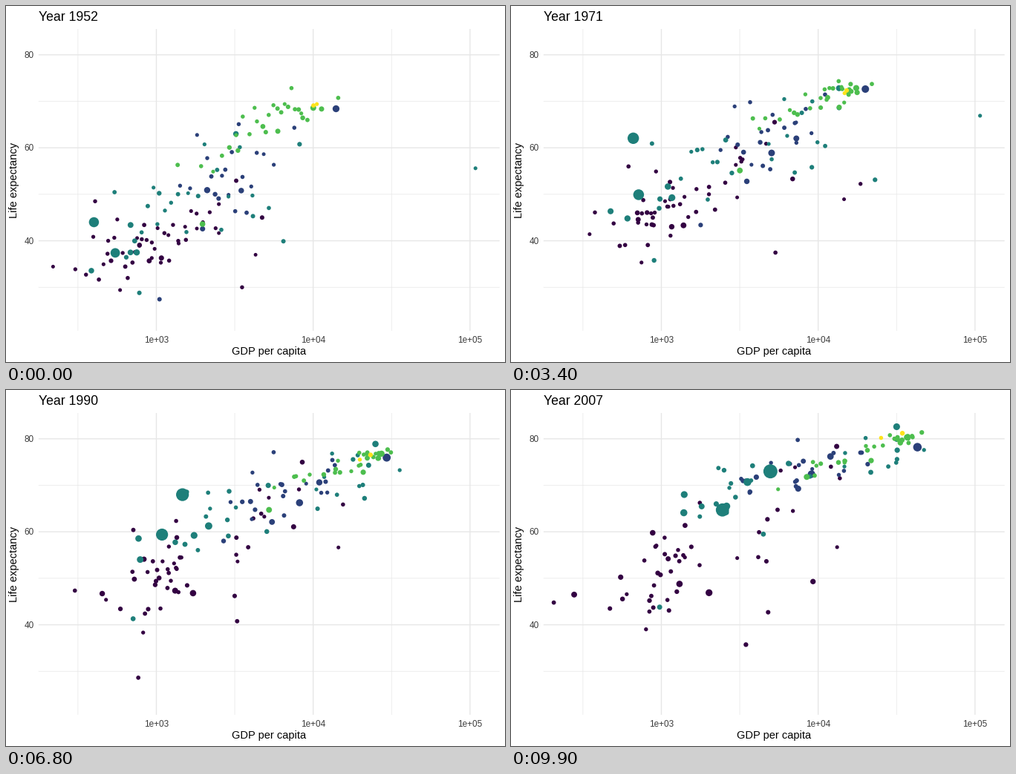
Recreate the animation shown at these times as a matplotlib script. Size 672 px wide and 480 px high, loop 10000 ms.

```python
import numpy as np
import matplotlib.pyplot as plt
from matplotlib.animation import FuncAnimation

W, H, DPI = 672, 480, 96
FRAMES, INTERVAL = 100, 100
START, MID, END = 1952, 1982, 2007
LEFT, RIGHT, TOP, BOTTOM = 43.8, 664.7, 31.0, 437.9
YEARS = np.linspace(START, END, FRAMES)
PROGRESS = np.linspace(0, 1, FRAMES)

AFRICA, AMERICAS, ASIA = "#330042", "#2b4079", "#1e7f7a"
EUROPE, OCEANIA = "#4dbe4e", "#fde31c"
GROWTH = {AFRICA: 3.8, AMERICAS: 2.2, ASIA: 2.6, EUROPE: 1.3, OCEANIA: 2.2}

plt.rcParams["font.family"] = "Liberation Sans"
rng = np.random.default_rng(7)


def to_x(log_gdp):
    return LEFT + (log_gdp - 2.2487) / 2.94 * (RIGHT - LEFT)


def to_y(life):
    return TOP + (85.553 - life) / 64.905 * (BOTTOM - TOP)


def radius(pop):
    """Pixel radius for a population in millions."""
    return 2.365 + 7.11 * np.sqrt(pop / 1318.7)


def curve(values):
    """Smooth path through the values at START, MID and END."""
    t = np.array([START, MID, END]) - MID
    return np.polyval(np.polyfit(t, values, 2), YEARS - MID)


xs, ys, radii, colors = [], [], [], []


def add(color, pop, log_gdp, life):
    xs.append(to_x(log_gdp))
    ys.append(to_y(life))
    first, last = radius(pop / GROWTH[color]), radius(pop)
    radii.append(first + (last - first) * PROGRESS)
    colors.append(color)


def dot(color, pop, first, mid, last, *stops):
    """One dot through (gdp, life) pairs, with extra (year, gdp, life) stops."""
    keys = sorted([(START, *first), (MID, *mid), (END, *last), *stops])
    year, gdp, life = np.array(keys, float).T
    gdp = np.log10(gdp)
    if stops:
        add(color, pop, np.interp(YEARS, year, gdp),
            np.interp(YEARS, year, life))
    else:
        add(color, pop, curve(gdp), curve(life))


def spread(n):
    """Evenly spaced bell-shaped scores in random order."""
    p = (np.arange(n) + 0.5) / n
    return rng.permutation(np.log(p / (1 - p)) / 1.75)


def cloud(color, n, pop, *keys):
    """Dots around a mean; keys are (log gdp, its spread, life, its spread)."""
    gdp, gdp_sd, life, life_sd = (curve(v) for v in zip(*keys))
    a, b = np.cos(0.9 * PROGRESS), np.sin(0.9 * PROGRESS)
    scores = zip(spread(n), spread(n), spread(n), spread(n), spread(n))
    for w0, w1, h0, h1, size in scores:
        wealth = w0 * a + w1 * b
        health = 0.6 * wealth + 0.8 * (h0 * a + h1 * b)
        add(color, pop * np.exp(size), gdp + gdp_sd * wealth,
            life + life_sd * health)


cloud(AFRICA, 34, 9, (2.87, 0.22, 38.2, 4), (3.02, 0.22, 49, 5),
      (3.03, 0.27, 52, 6.5))
cloud(AFRICA, 10, 6, (3.24, 0.16, 43.5, 4), (3.61, 0.12, 61, 5),
      (3.79, 0.18, 63, 10))
dot(AFRICA, 135, (1077, 36.3), (1577, 45.8), (2014, 46.9))
dot(AFRICA, 44, (4725, 45), (8569, 58.2), (9270, 49.3), (1992, 7225, 61.9))
dot(AFRICA, 12, (3521, 30), (2757, 39.9), (4797, 42.7), (1972, 5473, 37.9))
dot(AFRICA, 65, (781, 39.1), (674, 47.8), (278, 46.5), (2002, 241, 45))
dot(AFRICA, 9, (493, 40), (882, 46.2), (863, 46.2), (1992, 737, 23.6))
dot(AFRICA, 6, (2388, 42.7), (17364, 62.2), (12057, 74), (1972, 21011, 52.8))
dot(AFRICA, 1, (4293, 37), (15113, 56.6), (13206, 56.7), (1977, 21746, 52.8))
dot(AFRICA, 12, (407, 48.5), (789, 60.4), (470, 43.5), (1992, 693, 60.4))

cloud(AMERICAS, 22, 9, (3.45, 0.2, 53, 8.5), (3.75, 0.22, 66, 6),
      (3.87, 0.27, 73, 3.5))
dot(AMERICAS, 301, (13990, 68.4), (25010, 74.7), (42952, 78.2))
dot(AMERICAS, 190, (2109, 50.9), (7031, 63.3), (9066, 72.4))
dot(AMERICAS, 109, (3478, 50.8), (9611, 67.4), (11978, 76.2))

cloud(ASIA, 14, 20, (3, 0.22, 45, 7), (3.32, 0.3, 60, 6),
      (3.46, 0.23, 69.5, 4))
cloud(ASIA, 9, 8, (3.46, 0.28, 53, 8), (4.09, 0.15, 69.5, 4.5),
      (4.4, 0.18, 77, 3))
dot(ASIA, 1318, (400, 44), (962, 65.5), (4959, 73),
    (1957, 576, 50.5), (1962, 488, 44.5), (1967, 613, 58.4),
    (1972, 677, 63.1), (1992, 1656, 68.7))
dot(ASIA, 1110, (547, 37.4), (856, 56.6), (2452, 64.7),
    (1962, 658, 43.6), (1972, 724, 50.7), (1992, 1164, 60.2))
dot(ASIA, 127, (3217, 63), (19384, 77.1), (31656, 82.6),
    (1972, 14779, 73.4), (1992, 26825, 79.4))
dot(ASIA, 223, (750, 37.5), (1517, 56.2), (3541, 70.7), (1992, 2383, 62.7))
dot(ASIA, 150, (684, 37.5), (677, 50), (1391, 64.1))
dot(ASIA, 169, (685, 43.4), (1444, 56.2), (2606, 65.5))
dot(ASIA, 2.5, (108382, 55.6), (31354, 71.3), (47307, 77.6),
    (1962, 95458, 60.5), (1972, 109348, 67.7), (1977, 59265, 69.3))
dot(ASIA, 27, (6460, 39.9), (33693, 63), (21655, 72.8),
    (1972, 24838, 53.9), (1987, 21198, 66.3))
dot(ASIA, 27, (4130, 45.3), (14518, 62), (4471, 59.5), (1992, 3746, 59.5))
dot(ASIA, 32, (779, 28.8), (978, 39.9), (975, 43.8), (1992, 649, 41.7))

cloud(EUROPE, 17, 12, (3.84, 0.16, 67.8, 3), (4.28, 0.1, 74.7, 1.2),
      (4.52, 0.09, 79.9, 0.9))
cloud(EUROPE, 12, 7, (3.53, 0.22, 61.5, 3.5), (4.02, 0.2, 70.8, 1),
      (4.12, 0.2, 74.8, 1.8))
dot(EUROPE, 71, (1969, 43.6), (4241, 61), (8458, 71.8))

dot(OCEANIA, 20, (10040, 69.1), (19477, 74.7), (34435, 81.2))
dot(OCEANIA, 4, (10557, 69.4), (17632, 73.8), (25185, 80.2))

xs, ys, radii = map(np.array, (xs, ys, radii))

fig = plt.figure(figsize=(W / DPI, H / DPI), dpi=DPI, facecolor="white")
ax = fig.add_axes([0, 0, 1, 1])
ax.set(xlim=(0, W), ylim=(H, 0))
ax.axis("off")


def grid(x, y, px):
    ax.plot(x, y, color="#e7e7e7", lw=px * 72 / DPI, snap=False,
            solid_capstyle="butt", zorder=1)


def hline(life, px):
    grid([LEFT, RIGHT], [to_y(life)] * 2, px)


def vline(log_gdp, px):
    grid([to_x(log_gdp)] * 2, [TOP, BOTTOM], px)


def label(x, y, text, size, color="black", **kw):
    return ax.text(x, y, text, fontsize=size, color=color, **kw)


for life in (30, 50, 70):
    hline(life, 0.71)
for log_gdp in (2.5, 3.5, 4.5):
    vline(log_gdp, 0.71)
for life in (40, 60, 80):
    hline(life, 1.42)
    label(38, to_y(life) + 4.2, str(life), 8.8, "#3b3b3b", ha="right")
for log_gdp in (3, 4, 5):
    vline(log_gdp, 1.42)
    label(to_x(log_gdp), 453.5, f"1e+0{log_gdp}", 8.8, "#3b3b3b", ha="center")

label((LEFT + RIGHT) / 2, 470, "GDP per capita", 11, ha="center")
label(18, (TOP + BOTTOM) / 2, "Life expectancy", 11, rotation=90,
      ha="right", va="center")
title = label(LEFT, 20, "", 13.2)
points = ax.scatter(xs[:, 0], ys[:, 0], c=colors, linewidths=0, zorder=2)


def update(i):
    title.set_text(f"Year {round(YEARS[i])}")
    points.set_offsets(np.column_stack([xs[:, i], ys[:, i]]))
    points.set_sizes((2 * radii[:, i] * 72 / DPI) ** 2)
    return title, points


anim = FuncAnimation(fig, update, frames=FRAMES, interval=INTERVAL,
                     repeat=True, repeat_delay=0)
plt.show()
```
